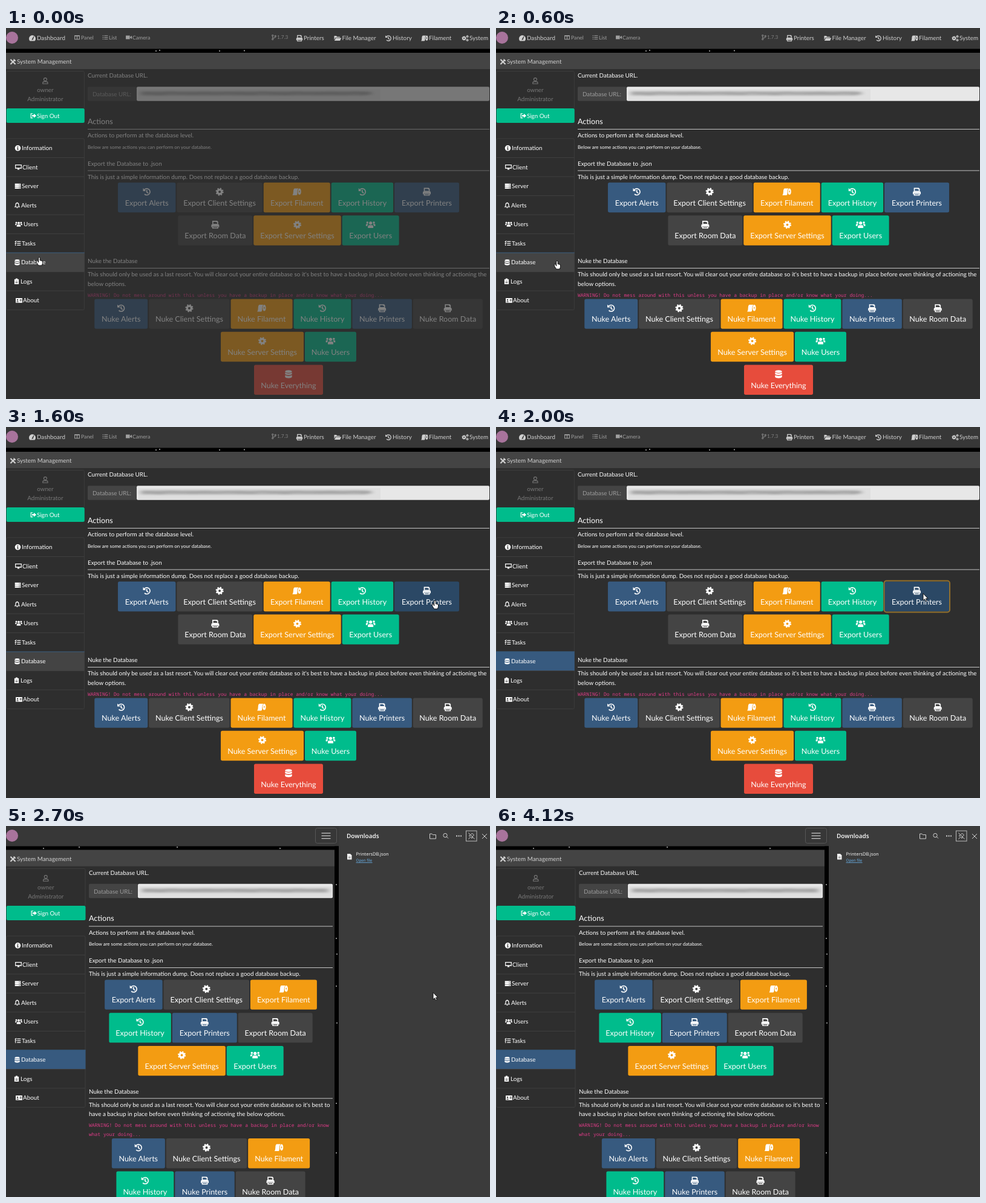
Write an HTML page that moves like this. It is 800 px wide and 614 px high and loops after 4.23 s.

```html
<!DOCTYPE html>
<html lang="en">
<head>
<meta charset="utf-8">
<title>Database export</title>
<style>
html, body { margin: 0; width: 100%; height: 100%; overflow: hidden; background: #2e2e2e; }
svg { display: block; width: 800px; height: 614px; }
text { font-family: Lato, sans-serif; fill: currentColor; white-space: pre; text-rendering: geometricPrecision; }
.mono { font-family: "Noto Sans Mono", monospace; font-weight: 500; }
.ui { font-family: "Open Sans", sans-serif; }
.icon { fill: currentColor; }
.line { fill: none; stroke: currentColor; stroke-width: 2; }
</style>
</head>
<body>
<svg id="stage" viewBox="0 0 800 614">
<defs>
  <filter id="blur" x="-5%" y="-80%" width="110%" height="260%"><feGaussianBlur stdDeviation="4 1.7"/></filter>
  <g id="history"><path class="line" d="M-5-4A6.5 6.5 0 1 1-4.6 4.6"/><path d="M-7.6-7.4V-1.4H-1.6z"/><path class="line" d="M0-3.8V.5L3 2.7"/></g>
  <g id="cog"><circle class="line" r="4.4" style="stroke-width:4"/><circle class="line" r="6.8" style="stroke-width:2.6" stroke-dasharray="2.67"/></g>
  <g id="cogs"><use href="#cog" transform="translate(-3 0) scale(.7)"/><use href="#cog" transform="translate(5.5 -4.5) scale(.42)"/><use href="#cog" transform="translate(5.5 4.5) scale(.42)"/></g>
  <g id="print" fill-rule="evenodd"><path d="M-6-8H4L6-6V-1H-6zM-4-6V-2H4V-5H2V-6z"/><path d="M-8 1Q-8-1-6-1H6Q8-1 8 1V5H6V3H-6V5H-8z"/><path d="M-6 3.5H6V8H-6zM-4 5V6.4H4V5z"/></g>
  <g id="roll" fill-rule="evenodd"><path d="M-4-7H3.4Q1-5 1 0V3Q1 6-.6 7H-9Q-7.2 5-7.2 0Q-7.2-7-4-7z"/><path d="M5.4-7C9.8-7 9.8 6 5.4 6S1-7 5.4-7zM5.4-2.6C4.2-2.6 4.2 1.4 5.4 1.4S6.6-2.6 5.4-2.6z"/></g>
  <g id="users"><circle cy="-3.4" r="3.2"/><circle cx="-6.6" cy="-4.4" r="2.2"/><circle cx="6.6" cy="-4.4" r="2.2"/><path d="M-5.5 6.5V4Q-5.5 .7-2.5 .7H2.5Q5.5 .7 5.5 4V6.5zM-9.6 2.5V0Q-9.6-1.6-8-1.6H-4.4Q-6.4 .2-6.8 2.5zM9.6 2.5V0Q9.6-1.6 8-1.6H4.4Q6.4 .2 6.8 2.5z"/></g>
  <g id="db"><path d="M-7-5.3C-7-9 7-9 7-5.3S-7-1.6-7-5.3zM-7-3Q0 .6 7-3V.2Q0 4-7 .2zM-7 2.2Q0 5.8 7 2.2V5.4C7 9-7 9-7 5.4z"/></g>
  <g id="info" fill-rule="evenodd"><path d="M0-8A8 8 0 0 1 0 8 8 8 0 0 1 0-8zM-1.4-5.2V-2.6H1.4V-5.2zM-2-1.4V.4H-1V3.2H-2V5H2V3.2H1V-1.4z"/></g>
  <g id="desktop" fill-rule="evenodd"><path d="M-9-7H9V4H-9zM-7-5V1.5H7V-5zM-2 4H2L3 7H-3z"/></g>
  <g id="server" fill-rule="evenodd"><path d="M-8-7H8V-2.7H-8zM3-5.5V-4.3H6V-5.5zM-8-2H8V2.2H-8zM3-.6V.7H6V-.6zM-8 3H8V7.2H-8zM3 4.5V5.7H6V4.5z"/></g>
  <g id="bell"><path class="line" d="M-6 4.5Q-4 2-4-1.5C-4-7.5 4-7.5 4-1.5Q4 2 6 4.5z"/><path d="M-2 6H2Q1.5 8 0 8T-2 6zM-1-8H1V-5H-1z"/></g>
  <g id="tasks"><path class="line" d="M-2-5H8M-2 0H8M-2 5H8M-8-5L-6.5-3.5-4-7M-8 0L-6.5 1.5-4-2"/><circle cx="-6.3" cy="5" r="1.5"/></g>
  <g id="clip" fill-rule="evenodd"><path d="M-6-6H6V8H-6zM-3-1V.4H3V-1zM-3 3V4.4H3V3z"/><path d="M-2.5-8H2.5V-4H-2.5z"/></g>
  <g id="card" fill-rule="evenodd"><path d="M-9-6.5H9V6.5H-9zM-4-3.5A2 2 0 0 0-4 .5 2 2 0 0 0-4-3.5zM-7 4.5H-1Q-1 1.8-4 1.8T-7 4.5zM2-3V-1.4H7V-3zM2 .5V2H7V.5z"/></g>
  <g id="exit"><path class="line" d="M-2-6H-7V6H-2"/><path d="M-4-2.2H1V-6L8 0 1 6V2.2H-4z"/></g>
  <g id="tools"><path class="line" style="stroke-width:3.4" d="M-6.5-6.5L6.5 6.5M5.5-5.5L-6.5 6.5"/><path class="line" d="M2.5-7.5V-2.5H7.5"/></g>
  <g id="gauge" fill-rule="evenodd"><path d="M-6 7A8.5 8.5 0 1 1 6 7zM-1.8 4H1.8L4.5-4.5 3.2-5z"/><path d="M-6-.8H-4V1.2H-6zM-1-6.5H1V-4.5H-1z"/></g>
  <g id="columns"><path class="line" d="M-7-5.5H7V6H-7zM0-5V6M-7-4.4H7"/></g>
  <g id="list"><path class="line" d="M-8-5H-5M-8 0H-5M-8 5H-5M-3-5H8M-3 0H8M-3 5H8"/></g>
  <g id="video"><path d="M-9-5.5H3V5.5H-9zM4-1.5L9-5V5L4 1.5z"/></g>
  <g id="branch"><g class="line"><circle cx="-4" cy="-5.5" r="2"/><circle cx="-4" cy="5.5" r="2"/><circle cx="4" cy="-3.5" r="2"/><path d="M-4-3.5V3.5M4-1.5Q4 1.5-4 2"/></g></g>
  <g id="folder"><path d="M-8.5-6H-3L-1-4H6V-1.8H-5L-8.5 4zM-4.2-.8H9.5L6.3 6H-8z"/></g>
  <g id="person"><g class="line" style="stroke-width:1.6"><circle cy="-3.5" r="3.6"/><path d="M-6 7V5Q-6 2-3 2H3Q6 2 6 5V7z"/></g></g>
</defs>
</svg>
<script>
const LOOP = 4230;
const BASE = 9.86, SMALL = 7.95, LARGE = 12.55;
const BLUE = '#375a7f', DARK = '#2b4865', GREY = '#444', AMBER = '#f39c12', GREEN = '#00bc8c', RED = '#e74c3c';

// y is the middle of the capitals; baselines sit on whole pixels
const text = (s, x, y, size = BASE, color = '#fff', extra = '') =>
  `<text x="${x}" y="${Math.round(y + size * .345)}" font-size="${size}" color="${color}" ${extra}>${s}</text>`;
const mid = 'text-anchor="middle"';
const rect = (x, y, w, h, fill, extra = '') =>
  `<rect x="${x}" y="${y}" width="${w}" height="${h}" fill="${fill}" ${extra}/>`;
const icon = (name, x, y, size, color = '#fff') =>
  `<use class="icon" href="#${name}" transform="translate(${x} ${y}) scale(${size / 16})" color="${color}"/>`;
const group = (id, body, extra = '') => `<g id="${id}" ${extra}>${body}</g>`;
const dots = list => list.map(([x, y]) => `<circle cx="${x}" cy="${y}" r="1.1" fill="#aaa"/>`).join('');
const logo = y => `<circle cx="10" cy="${y}" r="10" fill="#a8749c"/>`;

// label: colour, icon, width after "Export", width after "Nuke"
const kinds = {
  'Alerts': [BLUE, 'history', 95.5, 88],
  'Client Settings': [GREY, 'cog', 141.5, 133.5],
  'Filament': [AMBER, 'roll', 110, 102],
  'History': [GREEN, 'history', 102.5, 95],
  'Printers': [BLUE, 'print', 107, 98.5],
  'Room Data': [GREY, 'print', 123, 115],
  'Server Settings': [AMBER, 'cog', 144.5, 137],
  'Users': [GREEN, 'users', 94, 85],
  'Everything': [RED, 'db', 114, 114]
};

function buttons(verb, names, cx, y, scene) {
  const gap = 1.9, col = verb === 'Export' ? 2 : 3;
  const total = names.reduce((sum, n) => sum + kinds[n][col] + gap, -gap);
  let x = cx - total / 2, out = '';
  for (const n of names) {
    const [color, glyph] = kinds[n], w = kinds[n][col], c = x + w / 2;
    const id = verb + n === 'ExportPrinters' ? `id="${scene}Btn"` : '';
    out += rect(x, y, w, 49.4, color, `rx="2.7" ${id}`)
      + icon(glyph, c, y + 15.3, 13) + text(verb + ' ' + n, c, y + 33.7, LARGE, '#fff', mid);
    x += w + gap;
  }
  return out;
}

function sidebar(w, scene) {
  const rows = [['info', 'Information', 26], ['desktop', 'Client', 27], ['server', 'Server', 26],
    ['bell', 'Alerts', 25], ['users', 'Users', 29], ['tasks', 'Tasks', 26], ['db', 'Database', 25],
    ['clip', 'Logs', 24], ['card', 'About', 28]];
  const c = w / 2 + .5, edge = 'stroke="#3d3d3d"';
  let out = rect(.5, 71.5, w, 62, 'none', edge + ' rx="2"')
    + icon('person', c, 87.5, 11, '#777') + text('owner', c, 103, BASE, '#777', mid)
    + text('Administrator', c, 118, BASE, '#777', mid)
    + rect(.7, 133, w + .3, 24, GREEN, 'rx="2.5"')
    + icon('exit', c - 19.5, 145.3, 9.5) + text('Sign Out', c - 14, 145.3)
    + rect(.5, 183, w, 283.5, 'none', edge + ' rx="2"');
  rows.forEach(([glyph, label, x], i) => {
    const y = 183 + i * 31.5;
    if (label === 'Database') {
      out += rect(0, y - .5, w + 1, 32, scene === 'wide' ? GREY : BLUE, `id="${scene}Row"`) + rect(0, y - .5, w + 1, 1, BLUE);
    } else if (i) out += rect(.5, y - .5, w, 1, '#3f3f3f');
    out += icon(glyph, x - 6.5 - (glyph === 'users') * 1.5, y + 15.8, 9.6) + text(label, x, y + 15.8);
  });
  return out;
}

function urlField(x, y, end, patch, smear) {
  let marks = '';
  for (let i = 0; i * 19 < smear - 12; i++) {
    marks += rect(x + 89 + i * 19, y + 8.5 + Math.sin(i * 2.3) * .8, 19, 4 + Math.sin(i * 1.7), '#a6a6a6');
  }
  return rect(x, y, 81, 23.5, GREY, 'rx="2"') + text('Database URL:', x + 8, y + 12.3, BASE, '#9c9c9c')
    + rect(x + 81, y, end - x - 81, 23.5, '#e7e7e7', 'rx="2"')
    + rect(x + 84, y + 4, patch, 18, '#dfdfdf')
    + `<g filter="url(#blur)">${rect(x + 88, y + 7.5, smear, 7, '#b4b4b4')}${marks}</g>`;
}

const rule = (x, y, end) => rect(x, y, end - x, 1, '#c4c4c4');
const pink = (s, x, y) => text(s, x, y, 7.97, '#e03c88', 'class="mono"');
const heading = (x, y, s) => text(s, x, y, BASE);

const wideNav = rect(0, 0, 800, 35, '#373737') + rect(0, 34.5, 800, 6.5, '#000')
  + dots([[248, 38], [254, 37], [353, 38], [394, 37.5]]) + logo(16)
  + [['gauge', 43.5, 'Dashboard', 51], ['print', 485, 'Printers', 492], ['folder', 548, 'File Manager', 555.5],
     ['history', 632, 'History', 639], ['roll', 692, 'Filament', 699], ['cogs', 759, 'System', 766]]
    .map(([g, gx, s, x]) => icon(g, gx, 17, 10.4, '#cfcfcf') + text(s, x, 17, BASE, '#cfcfcf')).join('')
  + [['columns', 117.5, 'Panel', 124], ['list', 164, 'List', 170], ['video', 203, 'Camera', 209]]
    .map(([g, gx, s, x]) => icon(g, gx, 15.5, 8.8, '#a0a0a0') + text(s, x, 15.5, 8.7, '#a0a0a0')).join('')
  + icon('branch', 443, 15.5, 9, '#808080') + text('1.7.3', 448, 15.5, 8.3, '#808080');

const title = (y, w) => rect(0, y, w, 27, GREY) + icon('tools', 11.5, y + 15, 10, '#d0d0d0')
  + text('System Management', 18, y + 15, BASE, '#d0d0d0');

const intro = (x, y, end) => heading(x, y, 'Current Database URL.')
  + text('Actions', x, y + 75.5, LARGE) + rule(x, y + 88, end)
  + heading(x, y + 99, 'Actions to perform at the database level.')
  + text('Below are some actions you can perform on your database.', x, y + 118, SMALL)
  + heading(x, y + 145.5, 'Export the Database to .json') + rule(x, y + 156.5, end)
  + heading(x, y + 167.3, 'This is just a simple information dump. Does not replace a good database backup.');

const wideBody = intro(135, 79, 799) + urlField(135, 97.3, 799, 400, 374)
  + buttons('Export', ['Alerts', 'Client Settings', 'Filament', 'History', 'Printers'], 467, 255.8, 'wide')
  + buttons('Export', ['Room Data', 'Server Settings', 'Users'], 467, 310.3)
  + heading(135, 386, 'Nuke the Database') + rule(135, 397, 799)
  + heading(135, 408, "This should only be used as a last resort. You will clear out your entire database so it's best to have a backup in place before even thinking of actioning the")
  + heading(135, 424, 'below options.')
  + pink('WARNING! Do not mess around with this unless you have a backup in place and/or know what your doing...', 135, 442)
  + buttons('Nuke', ['Alerts', 'Client Settings', 'Filament', 'History', 'Printers', 'Room Data'], 467, 448.4)
  + buttons('Nuke', ['Server Settings', 'Users'], 467, 502.8)
  + buttons('Nuke', ['Everything'], 467, 557.5)
  + rect(641.5, 254.5, 108.5, 52, 'none', 'id="ring" rx="4" stroke="#93702c" stroke-width="2"');

const narrowNav = rect(0, 0, 550, 33.5, '#373737') + rect(0, 33.5, 550, 6, '#000') + rect(543, 33.5, 7, 580.5, '#000')
  + dots([[62, 37], [121, 35], [283, 35], [453, 37], [546, 97], [546, 186], [547, 212], [546, 265], [547, 326], [546, 459], [546, 541]])
  + logo(16) + rect(511.5, 3.5, 35, 25, 'none', 'rx="3" stroke="#575757"')
  + [11.2, 15.6, 20].map(y => rect(521.5, y, 15, 1.3, '#c4c4c4')).join('');

const narrowBody = intro(137, 77.5, 540) + urlField(137, 95.8, 540, 318, 308)
  + buttons('Export', ['Alerts', 'Client Settings', 'Filament'], 338.5, 254.4)
  + buttons('Export', ['History', 'Printers', 'Room Data'], 338.5, 309.2, 'narrow')
  + buttons('Export', ['Server Settings', 'Users'], 338.5, 363.9)
  + heading(137, 439.8, 'Nuke the Database') + rule(137, 450.3, 540)
  + heading(137, 461.7, "This should only be used as a last resort. You will clear out your entire database so it's best to")
  + heading(137, 477, 'have a backup in place before even thinking of actioning the below options.')
  + pink('WARNING! Do not mess around with this unless you have a backup in place and/or know', 137, 495)
  + pink('what your doing...', 137, 510.3)
  + buttons('Nuke', ['Alerts', 'Client Settings', 'Filament'], 338.5, 517)
  + buttons('Nuke', ['History', 'Printers', 'Room Data'], 338.5, 571.6);

let bones = rect(563, 11, 66, 11, '#494949');
for (let i = 0; i < 4; i++) bones += rect(722 + i * 20.8, 10.5, 12, 12, '#494949');
for (let i = 0; i < 18; i++) {
  const y = 40.7 + i * 32.55;
  bones += rect(563, y + 5, 10.5, 10.5, '#494949') + rect(579, y, 133, 9.5, '#494949') + rect(579, y + 11.5, 33, 9.5, '#494949');
}

const downloads = text('Downloads', 563, 17, 10, '#fff', 'class="ui" font-weight="600"')
  + `<g fill="none" stroke="#d0d0d0">
      <path d="M700.5 13H704L705.5 14.5H710.5V21H700.5z"/>
      <circle cx="726" cy="15.5" r="3.2"/><path d="M728.3 17.8L731 20.5M787 13L795 21M795 13L787 21"/>
      <path d="M744 16.5H753" stroke-width="2" stroke-dasharray="2 1.6"/>
      <rect x="760.5" y="8" width="17.5" height="17" stroke="#bbb"/>
      <path d="M764.5 21.5L767 19M765.5 16L770 20.5 771 17.5 773.5 15 770.5 12 768 14.5zM764.5 11.5L774.5 21.5"/>
    </g><path d="M564 46H569L571.5 48.5V55.5H564z" fill="#f2f2f2"/><path d="M566 50.5H569.5V53.5H566z" fill="#aaa"/>`
  + text('PrintersDB.json', 578.5, 46.3, 7.5, '#fff', 'class="ui"')
  + group('openFile', text('Open file', 578.5, 56.6, 6.3, '#6cb6f0', 'class="ui"') + rect(578.5, 60.3, 27, .8, '#6cb6f0'));

const outline = 'fill="#fff" stroke="#000" stroke-width=".9"';
const cursors = group('hand', `<path ${outline} d="M-1.3 0Q0-1.4 1.2 0V4.6L5.5 5.6V9.5L4.3 13H-1.3L-4.5 8Q-4-.2-1.3 8z"/>`)
  + group('arrow', `<path ${outline} d="M0 0V11.5L2.6 9.2 4.4 13 6.2 12.2 4.5 8.4H8z"/>`)
  + group('beam', '<path fill="none" stroke="#ddd" d="M-2.5-5.5H-.8L0-4.7.8-5.5H2.5M0-5V5M-2.5 5.5H-.8L0 4.7.8 5.5H2.5"/>');

document.getElementById('stage').insertAdjacentHTML('beforeend',
  group('wide', rect(0, 0, 800, 614, '#2e2e2e') + wideNav + title(41, 800) + sidebar(128.8, 'wide') + group('content', wideBody))
  + group('narrow', rect(0, 0, 550, 614, '#2e2e2e') + narrowNav + title(39.7, 543)
    + `<g transform="translate(0 -1)">${sidebar(130.5, 'narrow')}</g>` + narrowBody
    + rect(550, 0, 250, 614, '#3b3b3b') + group('bones', bones) + group('files', downloads))
  + group('cursor', cursors));

const $ = id => document.getElementById(id);
const show = (id, on) => { $(id).style.display = on ? '' : 'none'; };

// time, x, y of the pointer
const path = [[0, 55, 380], [300, 55, 380], [600, 101, 386], [700, 190, 392], [900, 565, 406], [1000, 683, 411],
  [1100, 714, 413], [1200, 719, 397], [1600, 709, 288], [1700, 706, 275.5], [3000, 706, 275.5], [3100, 712, 320], [3300, 730, 556]];

function pointer(t) {
  const i = path.findIndex(p => p[0] > t);
  if (i < 0) return path[path.length - 1].slice(1);
  const [t0, x0, y0] = path[i - 1], [t1, x1, y1] = path[i], k = (t - t0) / (t1 - t0);
  return [x0 + (x1 - x0) * k, y0 + (y1 - y0) * k];
}

function draw() {
  const t = Math.floor(performance.now() % LOOP / 100) * 100;
  const [x, y] = pointer(t), wide = t < 2100, clicked = t >= 2000;
  const hover = wide && x > 642 && x < 749 && y > 255 && y < 305;
  const shape = wide && !clicked && (x < 129 || hover) ? 'hand' : wide && y > 401 && y < 430 ? 'beam' : 'arrow';

  show('wide', wide);
  show('narrow', !wide);
  $('content').setAttribute('opacity', t < 100 ? .4 : 1);
  $('wideBtn').setAttribute('fill', hover ? DARK : BLUE);
  $('wideRow').setAttribute('fill', clicked ? BLUE : GREY);
  $('narrowBtn').setAttribute('fill', t < 2200 ? '#304e6e' : BLUE);
  show('ring', clicked);
  show('bones', t < 2300);
  show('files', t >= 2300);
  show('openFile', t >= 2500);

  show('cursor', t < 3400);
  $('cursor').setAttribute('transform', `translate(${x} ${y})`);
  for (const c of ['hand', 'arrow', 'beam']) show(c, c === shape);
  requestAnimationFrame(draw);
}
draw();
</script>
</body>
</html>
```
